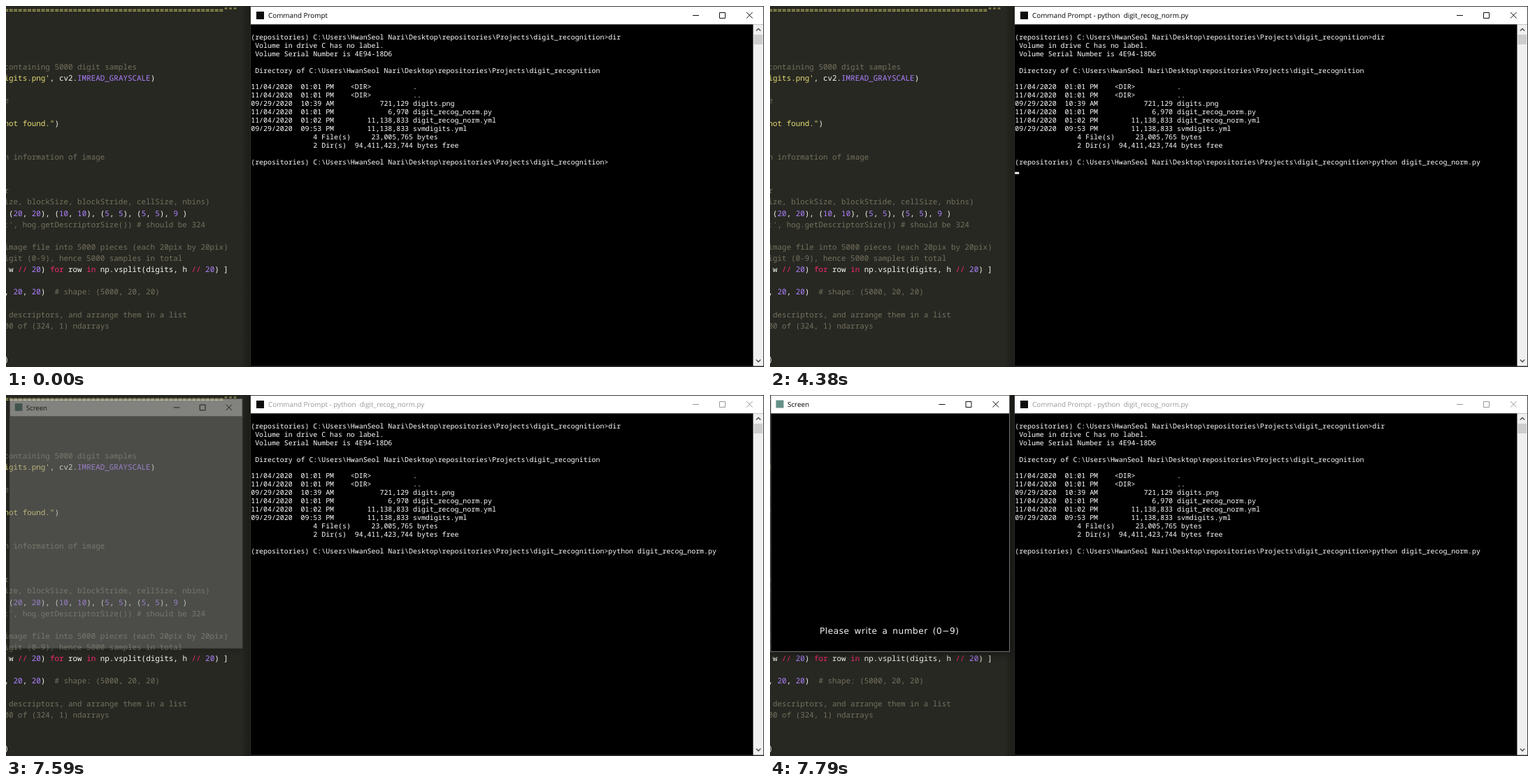
These frames come from a looping animation (1084 px wide and 517 px high, 8000 ms). An HTML page:

```html
<!DOCTYPE html>
<html lang="en">
<head>
<meta charset="utf-8">
<title>Digit demo</title>
<style>
  html, body { margin: 0; width: 100%; height: 100%; overflow: hidden; background: #272822; }
  svg { display: block; }
  text { white-space: pre; text-rendering: geometricPrecision; }
  .code { font: 10.9px "Noto Sans Mono", "DejaVu Sans Mono", monospace; }
  .term { font: 9.922px "Noto Sans Mono", "DejaVu Sans Mono", monospace; fill: #fff; }
  .title { font: 9.85px "Open Sans", "Noto Sans", sans-serif; }
  .ask { font: 12.2px "DejaVu Sans", sans-serif; letter-spacing: .5px; word-spacing: 2.5px; fill: #f4f4f4; }
</style>
</head>
<body>
<svg id="stage" width="1084" height="517" viewBox="0 0 1084 517">
  <defs>
    <linearGradient id="edge">
      <stop offset="0" stop-color="#000" stop-opacity="0"/>
      <stop offset="1" stop-color="#000" stop-opacity=".3"/>
    </linearGradient>
    <filter id="blur" x="-20%" y="-20%" width="140%" height="140%">
      <feGaussianBlur stdDeviation="6"/>
    </filter>
  </defs>
  <rect width="1084" height="517" fill="#272822"/>
  <g id="editor" class="code"></g>
  <rect x="336" width="14" height="517" fill="url(#edge)"/>

  <g id="console">
    <rect x="349.5" width="734.5" height="516" fill="#3c3c3c"/>
    <rect x="350" y="1" width="733" height="25.5" fill="#fff"/>
    <rect x="350" y="26.5" width="718.5" height="489" fill="#000"/>
    <rect x="1068.5" y="26.5" width="14.5" height="489" fill="#f0f0f0"/>
    <rect x="1069.5" y="41" width="12.5" height="14" fill="#cdcdcd"/>
    <path d="M1072.8 35.6l3.2-3.2 3.2 3.2M1072.8 506.6l3.2 3.2 3.2-3.2" fill="none" stroke="#505050" stroke-width="1.4"/>
    <rect x="358" y="8" width="11" height="11" fill="#0c0c0c"/>
    <text id="caption" class="title" x="375" y="17.2"></text>
    <g id="lines" class="term"></g>
    <rect id="cursor" y="225.8" width="6" height="3" fill="#f2f2f2"/>
  </g>

  <g id="screen">
    <rect x="1" y="3" width="342" height="368" fill="#000" opacity=".45" filter="url(#blur)"/>
    <rect x=".5" y="0" width="342.5" height="368" fill="#6e6e6e"/>
    <rect x="1.5" y="1" width="340.5" height="25.5" fill="#fff"/>
    <rect id="canvas" x="1.5" y="26.5" width="340.5" height="340.5"/>
    <rect x="8.5" y="7.5" width="11" height="11" fill="#66908a"/>
    <text class="title" x="25" y="17.2">Screen</text>
    <text id="ask" class="ask" x="71" y="342.2">Please write a number (0−9)</text>
  </g>
</svg>
<script>
const NS = "http://www.w3.org/2000/svg";
const $ = id => document.getElementById(id);

function add(parent, tag, attrs, text) {
  const el = document.createElementNS(NS, tag);
  for (const k in attrs) el.setAttribute(k, attrs[k]);
  if (text) el.textContent = text;
  parent.appendChild(el);
  return el;
}

// Editor: row number, then pairs of colour key and text
const INK = { c: "#75715e", s: "#e6db74", w: "#f8f8f2", n: "#ae81ff", k: "#f92672" };
const CODE = [
  [0, "s", "=".repeat(48) + '"""'],
  [5, "c", "containing 5000 digit samples"],
  [6, "s", "igits.png'", "w", ", cv2.", "n", "IMREAD_GRAYSCALE", "w", ")"],
  [8, "c", "e"],
  [10, "s", 'not found."', "w", ")"],
  [13, "c", "n information of image"],
  [16, "c", "r"],
  [17, "c", "ize, blockSize, blockStride, cellSize, nbins)"],
  [18, "w", " (", "n", "20", "w", ", ", "n", "20", "w", "), (", "n", "10", "w", ", ", "n", "10",
    "w", "), (", "n", "5", "w", ", ", "n", "5", "w", "), (", "n", "5", "w", ", ", "n", "5",
    "w", "), ", "n", "9", "w", " )"],
  [19, "c", ":', hog.getDescriptorSize()) # should be 324"],
  [21, "c", "image file into 5000 pieces (each 20pix by 20pix)"],
  [22, "c", "igit (0-9), hence 5000 samples in total"],
  [23, "w", " w ", "k", "//", "n", " 20", "w", ") ", "k", "for", "w", " row ", "k", "in",
    "w", " np.vsplit(digits, h ", "k", "//", "n", " 20", "w", ") ]"],
  [25, "w", ", ", "n", "20", "w", ", ", "n", "20", "w", ")  ", "c", "# shape: (5000, 20, 20)"],
  [27, "c", " descriptors, and arrange them in a list"],
  [28, "c", "00 of (324, 1) ndarrays"],
  [31, "w", ")"]
];
for (const [row, ...parts] of CODE) {
  const line = add($("editor"), "text", { x: -2.5, y: 10.2 + row * 16.13 });
  for (let i = 0; i < parts.length; i += 2) add(line, "tspan", { fill: INK[parts[i]] }, parts[i + 1]);
}

// Console
const X0 = 350.2, CHAR = 5.953, ROW = 11.9;
const PATH = "C:\\Users\\HwanSeol Nari\\Desktop\\repositories\\Projects\\digit_recognition";
const PROMPT = `(repositories) ${PATH}>`;
const COMMAND = "python digit_recog_norm.py";
const folder = name => "11/04/2020  01:01 PM    <DIR>          " + name;
const file = (date, size, name) => date + size.padStart(18) + " " + name;
const OUTPUT = [
  PROMPT + "dir",
  " Volume in drive C has no label.",
  " Volume Serial Number is 4E94-18D6",
  "",
  " Directory of " + PATH,
  "",
  folder("."),
  folder(".."),
  file("09/29/2020  10:39 AM", "721,129", "digits.png"),
  file("11/04/2020  01:01 PM", "6,970", "digit_recog_norm.py"),
  file("11/04/2020  01:02 PM", "11,138,833", "digit_recog_norm.yml"),
  file("09/29/2020  09:53 PM", "11,138,833", "svmdigits.yml"),
  "4".padStart(16) + " File(s)     23,005,765 bytes",
  "2".padStart(16) + " Dir(s)  94,411,423,744 bytes free",
  "",
  PROMPT
];
const rows = OUTPUT.map((s, i) => add($("lines"), "text", { x: X0, y: 48 + i * ROW }, s));
const input = rows[rows.length - 1];

// Window buttons
function buttons(parent, x) {
  return add(parent, "path", {
    d: `M${x} 13.5h9M${x + 38.5} 9.5h8v8h-8zM${x + 77} 9l8.6 8.6m0-8.6l-8.6 8.6`,
    fill: "none", stroke: "#111", "stroke-width": 1
  });
}
const consoleButtons = buttons($("console"), 982);
buttons($("screen"), 241.5);

// time, characters typed, cursor shown
const TYPING = [
  [0, 0, 0], [150, 1, 0], [200, 1, 1], [260, 2, 1], [410, 3, 1], [450, 4, 1],
  [600, 5, 1], [660, 6, 1], [720, 7, 0], [930, 7, 1], [1260, 7, 0], [1760, 7, 1],
  [2030, 8, 1], [2110, 9, 1], [2190, 10, 1], [2260, 10, 0], [2340, 11, 1], [2420, 12, 1],
  [2570, 26, 1], [3310, 26, 0]
];
const ENTER = 3490, RENAME = 3550, BLUR = 7500, PAINT = 7650, LOOP = 8000;
const BLINKS = [ENTER, 3830, 4380, 4870, 5370, 5920, 6480, 6970];
// time, scale, opacity of the opening window
const OPENING = [
  [0, 1, 0], [7590, .974, .42], [PAINT, .988, .78], [7700, .995, .92], [7745, .998, .98], [7790, 1, 1]
];
const latest = (list, t) => list.filter(e => e[0] <= t).pop();

function draw(t) {
  const [, typed, on] = latest(TYPING, t);
  const running = t >= ENTER;
  const lit = running ? BLINKS.filter(b => b <= t).length % 2 : on;
  input.textContent = PROMPT + COMMAND.slice(0, typed);
  $("cursor").setAttribute("x", X0 + (running ? 0 : (PROMPT.length + typed) * CHAR));
  $("cursor").setAttribute("y", running ? 225.8 + ROW : 225.8);
  $("cursor").setAttribute("opacity", lit);

  $("caption").textContent = "Command Prompt" + (t >= RENAME ? " - python  digit_recog_norm.py" : "");
  $("caption").setAttribute("fill", t >= BLUR ? "#999" : "#000");
  consoleButtons.setAttribute("stroke", t >= BLUR ? "#999" : "#111");

  const [, scale, opacity] = latest(OPENING, t);
  $("screen").setAttribute("opacity", opacity);
  $("screen").setAttribute("transform", `translate(171.5 184) scale(${scale}) translate(-171.5 -184)`);
  $("canvas").setAttribute("fill", t >= PAINT ? "#000" : "#808080");
  $("ask").setAttribute("opacity", t >= PAINT ? 1 : 0);
}

const start = performance.now();
function tick() {
  draw((performance.now() - start) % LOOP);
  requestAnimationFrame(tick);
}
tick();
</script>
</body>
</html>
```
